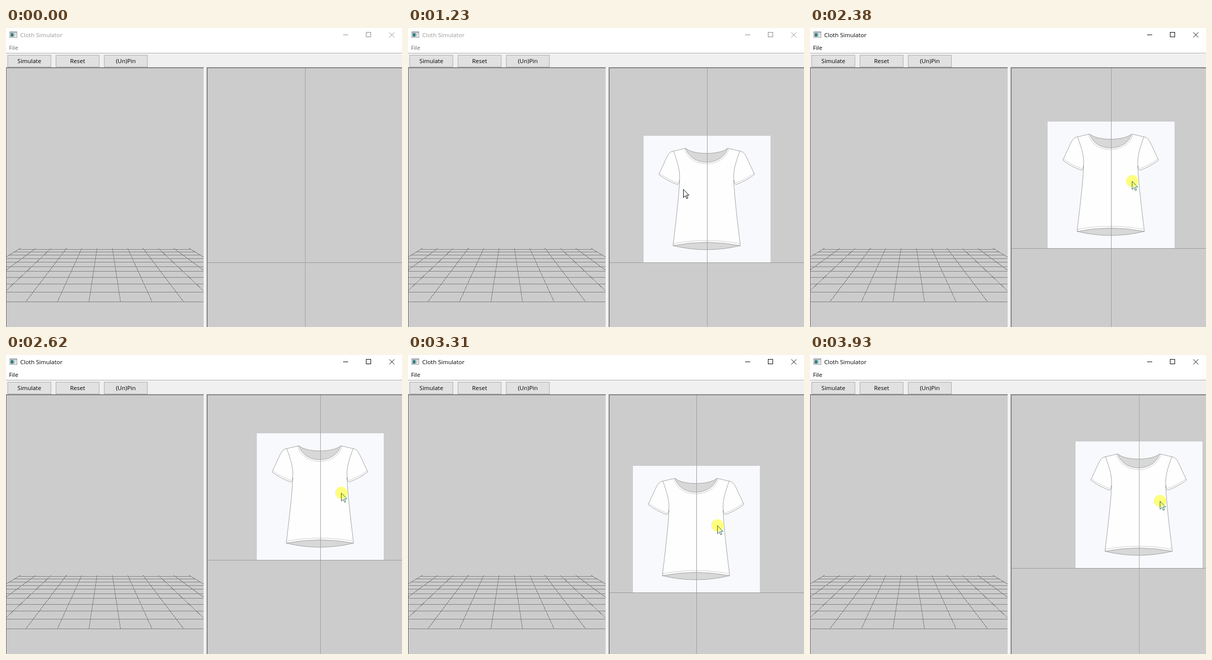
An HTML page that plays this animation: 780x588 px, repeating every 4010 ms.

```html
<!DOCTYPE html>
<html lang="en">
<head>
<meta charset="utf-8">
<title>Cloth Simulator</title>
<style>
  html, body { margin: 0; width: 100%; height: 100%; overflow: hidden; background: #fff; }
  svg { display: block; }
  text { font: 11.5px "Open Sans", "Noto Sans", sans-serif; }
  .mid { text-anchor: middle; }
  .crisp { shape-rendering: crispEdges; }
  .line { fill: none; stroke: #999; stroke-width: .9; }
  .stitch { fill: none; stroke: #999; stroke-width: .8; stroke-dasharray: 2 1.2; }
  #glow { fill: #ffff80; mix-blend-mode: multiply; }
</style>
</head>
<body>
<svg width="780" height="588" viewBox="0 0 780 588">
  <defs>
    <clipPath id="leftClip"><path d="M1 79H389V588H1z"/></clipPath>
    <clipPath id="rightClip"><path d="M397 79H780V588H397z"/></clipPath>
    <g id="half">
      <path class="line" d="M547 236.500L523 242C514 243 511 252 507 260L494 288Q511 301 531 308Q535 305 535 299C533 340 527 385 522 428M523 242C530 262 538 283 534 303"/>
      <path class="stitch" d="M495.500 285.500Q512 298 532.500 305"/>
    </g>
  </defs>

  <!-- window chrome -->
  <g class="crisp">
    <path fill="#a0a0a0" d="M0 49H780V50H0z"/>
    <path fill="#f0f0f0" d="M0 51H780V588H0z"/>
    <path fill="#a0a0a0" d="M0 77H390V78H0zM395 77H780V78H396V588H395z"/>
    <path fill="#696969" d="M0 78H389V79H1V588H0zM396 78H780V79H397V588H396z"/>
    <path fill="#fff" d="M390 77H391V588H390z"/>
    <path fill="#e3e3e3" d="M389 78H390V588H389z"/>
    <path fill="#ccc" d="M1 79H389V588H1zM397 79H780V588H397z"/>
    <path fill="#8a9499" d="M7 7H22V19H7z"/>
    <path fill="#f4f4f4" d="M8 9H21V18H8z"/>
    <path fill="#3b7f80" d="M9 10H15V17H9z"/>
    <path fill="#b5bcc0" d="M16 10H18V17H16zM19 10H20V13H19z"/>
  </g>
  <text id="title" x="28" y="18">Cloth Simulator</text>
  <text id="menu" x="6" y="43">File</text>
  <g id="controls" fill="none">
    <path class="crisp" d="M664 13.500H674M709.500 8.500H718.500V17.500H709.500z"/>
    <path d="M755 8.500L765 18.500M765 8.500L755 18.500"/>
  </g>
  <g id="buttons"></g>

  <g clip-path="url(#leftClip)">
    <path id="floor" class="crisp" fill="none" stroke="#808080"/>
  </g>

  <g clip-path="url(#rightClip)">
    <g id="shirt">
      <path class="crisp" fill="#f8f9fc" d="M464 212H714V461H464z"/>
      <path fill="#fefefe" d="M547 236.500L523 242C514 243 511 252 507 260L494 288Q511 301 531 308L535 299C533 340 527 385 522 428Q588 415 654.600 428C649 385 643 340 641.600 299L645 308Q665 301 682.600 288L669.600 260C665 252 662 243 653.600 242L629.600 236.500C618 273 558 273 547 236.500z"/>
      <path fill="#d8d8d9" stroke="#999" stroke-width=".9" d="M547 236.500C562 250 614 250 629.600 236.500C618 273 558 273 547 236.500zM522 428Q588 415 654.600 428Q588 444 522 428z"/>
      <path class="stitch" d="M544.500 237.500C555 277 621 277 632 237.500M523 424Q588 412 653.600 424"/>
      <use href="#half"/>
      <use href="#half" transform="translate(1176.600) scale(-1 1)"/>
    </g>
    <path id="axisX" class="crisp" fill="none" d="M397 461.500H780"/>
    <path id="axisY" class="crisp" fill="none" d="M589.500 79V588"/>
    <g id="cursor">
      <path id="arrow" fill="#fff" d="M.5 .5V16.500L4.300 12.800L6.800 18.500L9.200 17.500L6.700 11.800H11.500z"/>
      <g id="dropBadge" class="crisp" fill="#fff" stroke="#000">
        <path d="M7.500 20.500H17.500V30.500H7.500zM10 25.500H15M12.500 23V28"/>
      </g>
      <circle id="glow" r="12"/>
    </g>
  </g>
</svg>
<script>
const LOOP = 4010, START = 227, STEP = 77.1;
const GRAB = { step: 23, x: 630, y: 329 };
// pointer turning points: step, x, y
const PATH = [
  [0, 729, 228], [3, 606, 292], [5, 534, 317], [6, 526, 305], [7, 542, 317],
  [16, 542, 317], [17, 552, 316], [20, 630, 329], [22, 630, 329],
  [24, 617, 321], [31, 660, 271], [36, 610, 354], [43, 608, 323], [48, 689, 287]
];
const $ = id => document.getElementById(id);
const show = (id, on) => $(id).setAttribute("visibility", on ? "inherit" : "hidden");
const move = (id, x, y) => $(id).setAttribute("transform", `translate(${x} ${y})`);
const paint = (id, attr, color) => $(id).setAttribute(attr, color);

function buildButtons() {
  $("buttons").innerHTML = ["Simulate", "Reset", "(Un)Pin"].map((label, i) => {
    const x = 3 + 95 * i;
    return `<rect class="crisp" x="${x + .5}" y="53.5" width="85" height="23" fill="#e1e1e1" stroke="#adadad"/>
      <text class="mid" x="${x + 43}" y="69">${label}</text>`;
  }).join("");
}

function buildFloor() {
  const horizon = 334, cx = 194.5;
  const spread = y => (y - horizon) * .304;
  let d = "";
  for (let k = 0; k <= 10; k++) {
    const y = Math.floor(horizon + 1 / (.0049 + .0005 * k)) + .5;
    d += `M${cx - 5.5 * spread(y)} ${y}H${cx + 5.5 * spread(y)}`;
  }
  for (let i = -5.5; i <= 5.5; i++)
    d += `M${cx + i * spread(433)} 433L${cx + i * spread(538)} 538`;
  $("floor").setAttribute("d", d);
}

function pointer(step) {
  const i = PATH.findIndex(p => p[0] >= step);
  if (i < 0) return PATH[PATH.length - 1].slice(1);
  if (i === 0) return PATH[0].slice(1);
  const a = PATH[i - 1], b = PATH[i];
  const u = (step - a[0]) / (b[0] - a[0]), e = u * u * (3 - 2 * u);
  return [1, 2].map(n => Math.round(a[n] + (b[n] - a[n]) * e));
}

function render(t) {
  const step = Math.max(0, Math.floor((t - START) / STEP));
  const active = t >= 2000, dragging = step >= GRAB.step;
  const [x, y] = pointer(step);
  const dx = dragging ? x - GRAB.x : 0, dy = dragging ? y - GRAB.y : 0;

  paint("title", "fill", active ? "#000" : "#999");
  paint("menu", "fill", active ? "#000" : "#6d6d6d");
  paint("controls", "stroke", active ? "#000" : "#888");

  show("shirt", t >= 910);
  move("shirt", dx, dy);
  move("axisX", 0, dy);
  move("axisY", dx, 0);
  // the axes flash their colours in turn while dragging
  const flash = dragging && step % 12 === 0;
  const red = flash && step % 24 === 12;
  paint("axisX", "stroke", red ? "#c08a8a" : "#999");
  paint("axisY", "stroke", flash && !red ? "#8cba8c" : "#9e9e9e");

  show("cursor", (t >= 230 && t < 910) || t >= 1230);
  move("cursor", x, y);
  paint("arrow", "stroke", dragging ? "#2a6b4a" : "#000");
  show("dropBadge", t >= 230 && t < 910);
  show("glow", active);
}

function tick() {
  render(performance.now() % LOOP);
  requestAnimationFrame(tick);
}

buildButtons();
buildFloor();
tick();
</script>
</body>
</html>
```
